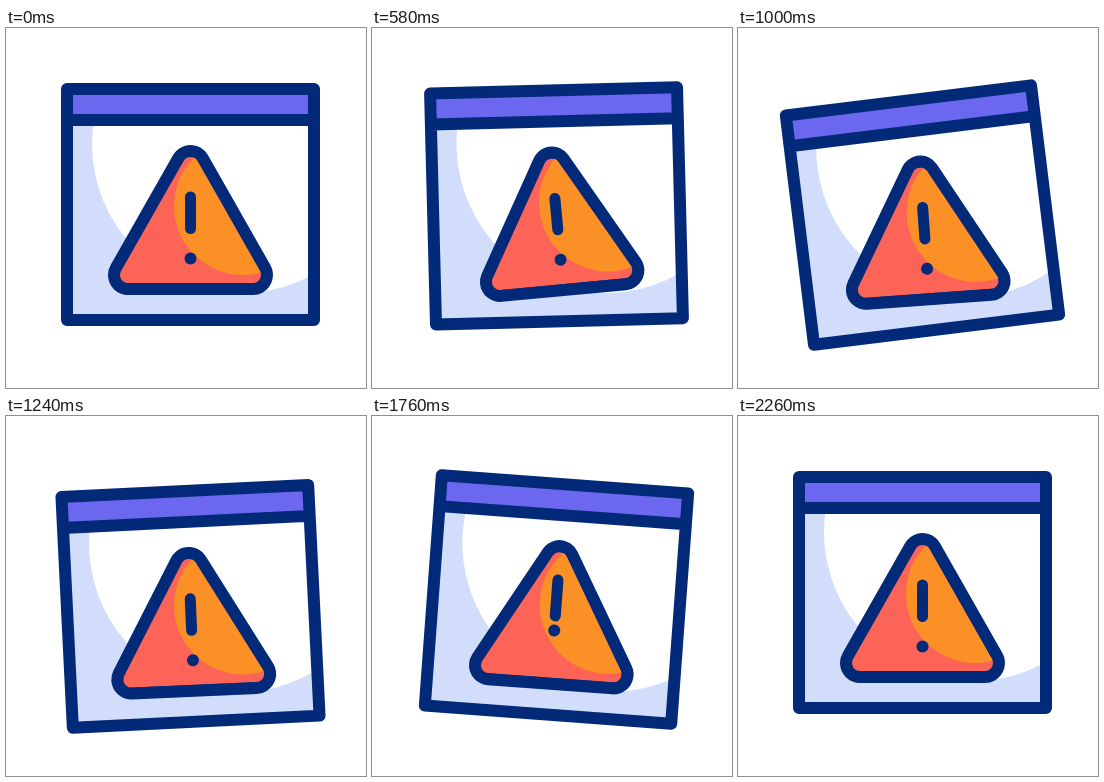
Recreate the animation shown at these times as an HTML page. Size 360 by 360 pixels, loop 2400 ms.

```html
<!DOCTYPE html>
<html lang="en">
<head>
<meta charset="utf-8">
<title>Warning window</title>
<style>
  html, body { margin: 0; width: 100%; height: 100%; overflow: hidden; background: #fff; }
  svg { display: block; width: 100vw; height: 100vh; }
  .ink { stroke: #032a78; stroke-width: 12; stroke-linecap: round; stroke-linejoin: round; fill: none; }
</style>
</head>
<body>
<svg viewBox="0 0 360 360">
  <defs>
    <clipPath id="pane"><rect x="61" y="61" width="247" height="231"/></clipPath>
    <clipPath id="inside"><path d="M177.6 133a8 8 0 0 1 13.8 0L253.9 243a8 8 0 0 1-6.9 12H122a8 8 0 0 1-6.9-12Z"/></clipPath>
  </defs>
  <g id="win">
    <g clip-path="url(#pane)">
      <rect x="61" y="92" width="247" height="200" fill="#d2ddfb"/>
      <circle cx="235" cy="116" r="149" fill="#fff"/>
      <rect x="61" y="61" width="247" height="31" fill="#6c67ef"/>
    </g>
    <path class="ink" d="M61 61H308V292H61ZM61 92H308"/>
    <g id="sign">
      <path d="M184.5 137L247 247H122Z" fill="#032a78" stroke="#032a78" stroke-width="40" stroke-linejoin="round"/>
      <g clip-path="url(#inside)">
        <rect x="100" y="120" width="170" height="140" fill="#fc6457"/>
        <circle cx="237" cy="178" r="69" fill="#fb9026"/>
      </g>
      <path id="bar" class="ink" style="stroke-width:11"/>
      <circle id="dot" cx="184.5" r="6" fill="#032a78"/>
    </g>
  </g>
</svg>
<script>
const LOOP = 2400;
const [win, sign, bar, dot] = ["win", "sign", "bar", "dot"].map(id => document.getElementById(id));

const ease = u => (1 - Math.cos(Math.PI * u)) / 2;

// Eased value through [time, value] keys, held at both ends.
function track(t, keys) {
  if (t <= keys[0][0]) return keys[0][1];
  for (let i = 1; i < keys.length; i++) {
    const [t0, a] = keys[i - 1], [t1, b] = keys[i];
    if (t < t1) return a + (b - a) * ease((t - t0) / (t1 - t0));
  }
  return keys[keys.length - 1][1];
}

function draw(t) {
  const drop = track(t, [[400, 0], [1300, 14], [2220, 0]]);
  const tilt = track(t, [[400, 0], [1000, -7], [1600, 5], [2220, 0]]);
  const sway = track(t, [[400, 0], [700, -5.9], [1000, 2.9], [1300, 0]]);
  const hop = track(t, [[1340, 0], [1780, 1], [2220, 0]]);

  win.setAttribute("transform", `translate(0 ${drop}) rotate(${tilt} 184.5 176.5)`);
  sign.setAttribute("transform", `rotate(${sway} 184.5 190)`);
  bar.setAttribute("d", `M184.5 ${169 - 12 * hop}V${200.5 - 7.5 * hop}`);
  dot.setAttribute("cy", 230.5 - 23 * hop);
}

const start = performance.now();
function tick() {
  draw((performance.now() - start) % LOOP);
  requestAnimationFrame(tick);
}
tick();
</script>
</body>
</html>
```
